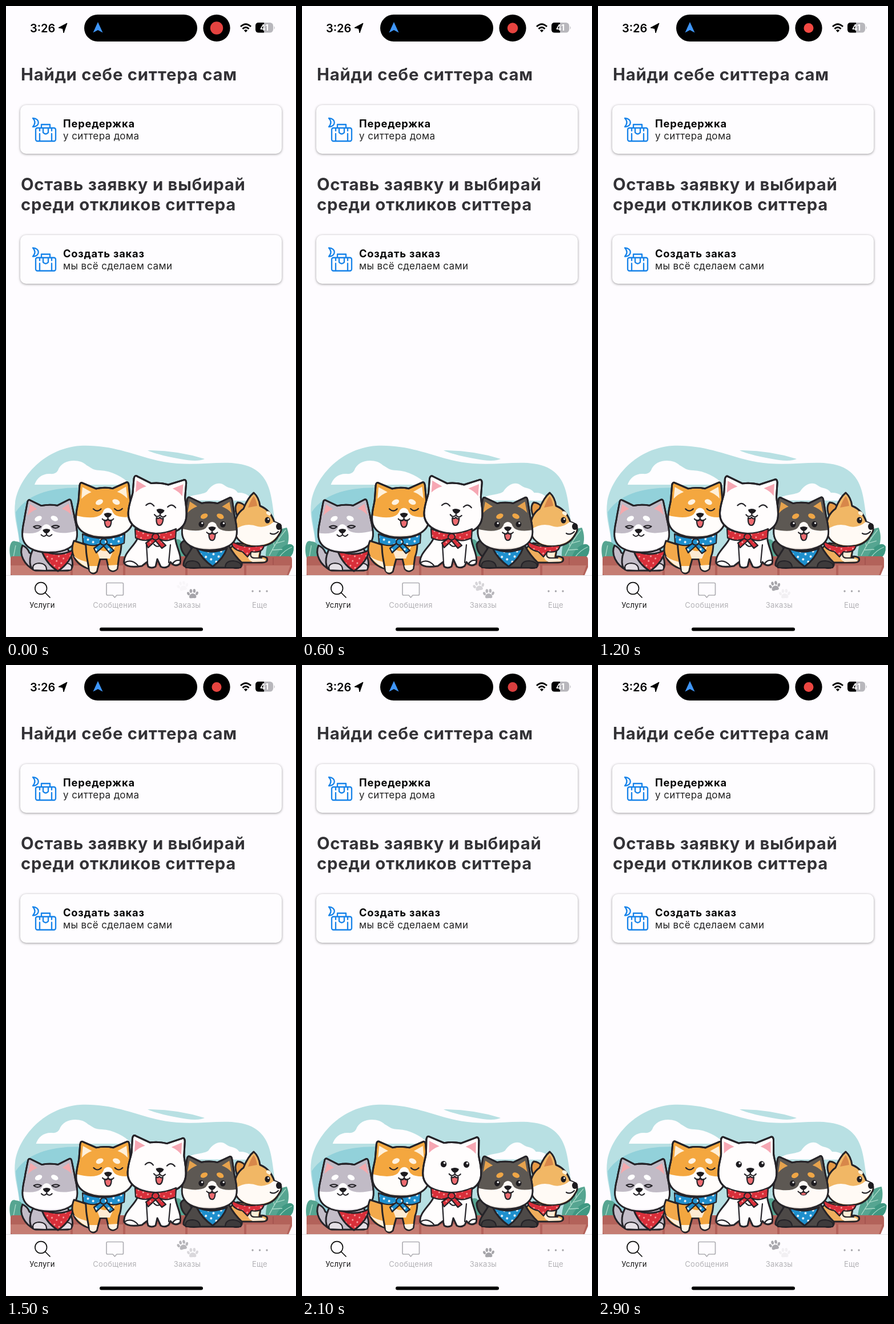
Write an HTML page that moves like this. It is 508x1102 px and loops after 3000 ms.

```html
<!DOCTYPE html>
<html lang="ru">
<head>
<meta charset="utf-8">
<style>
html, body { margin: 0; width: 100%; height: 100%; overflow: hidden; background: #fefcff; }
svg { display: block; font-family: Inter, Roboto, sans-serif; }
.h { font-size: 29.3px; font-weight: 700; letter-spacing: .75px; fill: #333236; }
.b { font-size: 18.3px; font-weight: 700; letter-spacing: .8px; fill: #050505; }
.s { font-size: 17px; letter-spacing: .4px; fill: #222; }
.tab { font-size: 13px; letter-spacing: .3px; fill: #b3b2b6; text-anchor: middle; }
.card { fill: #fefdff; filter: drop-shadow(0 1px 2px #0006); }
.ink { stroke: #252328; stroke-width: 3; stroke-linejoin: round; stroke-linecap: round; }
.thin { stroke: #252328; stroke-width: 2.2; stroke-linecap: round; stroke-linejoin: round; }
.line { fill: none; }
</style>
</head>
<body>
<svg id="stage" width="508" height="1102" viewBox="0 0 508 1102">
<defs>
  <pattern id="red" width="9" height="9" patternUnits="userSpaceOnUse" patternTransform="rotate(25)">
    <rect width="9" height="9" fill="#d92f3a"/><circle cx="4" cy="4" r="1.4" fill="#ffb3ae"/>
  </pattern>
  <pattern id="blue" width="10" height="10" patternUnits="userSpaceOnUse" patternTransform="rotate(25)">
    <rect width="10" height="10" fill="#1e8fcd"/><circle cx="4" cy="4" r="1.9" fill="#fff"/>
  </pattern>
  <g id="bag" fill="none" stroke="#1683e9" stroke-width="2.3" stroke-linejoin="round" stroke-linecap="round">
    <path d="M47 196Q54 203 47 211C60 211 60 196 47 196Z"/>
    <rect x="52" y="213" width="35" height="23" rx="3"/>
    <path d="M62 212V207H77V212M59 218V214M59 223V235M80 218V214M80 223V235M65 214V221Q69.500 226 74 221V214"/>
  </g>
  <g id="paw">
    <path d="M0 0C4 0 7 4 6 7C5 9 2 8 0 8C-2 8-5 9-6 7C-7 4-4 0 0 0Z"/>
    <ellipse cx="-7.500" cy="0" rx="2.200" ry="3.200" transform="rotate(-25 -7.500 0)"/>
    <ellipse cx="-3" cy="-4.500" rx="2.300" ry="3.400"/>
    <ellipse cx="3" cy="-4.500" rx="2.300" ry="3.400"/>
    <ellipse cx="7.500" cy="0" rx="2.200" ry="3.200" transform="rotate(25 7.500 0)"/>
  </g>
</defs>

<!-- status bar -->
<text x="42" y="45.500" font-size="20" font-weight="600">3:26</text>
<path d="M107 30L92 38L99.500 39.500L101 47Z" stroke="#000" stroke-linejoin="round"/>
<rect x="137" y="15" width="198" height="47" rx="23.500"/>
<path d="M161 28L169.500 46.500L161 42L152.500 46.500Z" fill="#3f96f8"/>
<circle cx="369" cy="38.500" r="23.600"/>
<circle id="rec" cx="369" cy="38.500"/>
<g fill="none" stroke="#000" stroke-width="2.900">
  <path d="M411 36Q420 27.500 429 36M414.500 40Q420 34.500 425.500 40"/>
</g>
<path d="M416.800 42.600Q420 39.800 423.200 42.600L420 46Z"/>
<rect x="437" y="29" width="31" height="17.500" rx="5.500" fill="#b8b7bc"/>
<path d="M452 29H442.500Q437 29 437 34.500V41Q437 46.500 442.500 46.500H452Z"/>
<path d="M469.500 35Q472 38 469.500 41Z" fill="#b8b7bc"/>
<text x="452.500" y="43" font-size="14" font-weight="700" fill="#fff" text-anchor="middle">41</text>

<!-- services -->
<text class="h" x="26" y="130">Найди себе ситтера сам</text>
<rect class="card" x="25" y="173" width="458" height="85" rx="10"/>
<use href="#bag"/>
<text class="b" x="100" y="212">Передержка</text>
<text class="s" x="100" y="233">у ситтера дома</text>
<text class="h" x="26" y="322">Оставь заявку и выбирай</text>
<text class="h" x="26" y="357">среди откликов ситтера</text>
<rect class="card" x="25" y="400" width="458" height="85" rx="10"/>
<use href="#bag" y="226.500"/>
<text class="b" x="100" y="438.500">Создать заказ</text>
<text class="s" x="100" y="459.500">мы всё сделаем сами</text>

<!-- landscape -->
<path fill="#b8e0e3" d="M24 962C26 920 12 900 16 868C20 830 62 773 130 768C200 765 240 795 300 799C350 803 395 790 430 806C470 826 464 870 474 915L480 962Z"/>
<path fill="#b8e0e3" d="M248 776Q300 776 348 791Q335 797 305 791Q265 784 248 776Z"/>
<path fill="#92d1da" d="M17 884C40 850 84 838 150 842V962H24C26 930 18 905 17 884Z"/>
<g id="clouds" fill="#fefdff">
  <path d="M50 836C54 824 64 816 78 817Q87 818 91 811C98 790 130 790 141 802C150 807 153 811 165 811C185 812 205 822 218 836Z"/>
  <path d="M312 863C325 851 343 855 352 848C360 835 374 829 384 838C392 844 399 840 406 850C420 849 428 856 430 864Z"/>
</g>
<g id="bush" fill="#56a591">
  <path d="M8 964C4 945 8 931 17 935C27 935 34 945 40 964Z"/>
  <path d="M288 964C286 940 294 928 304 932C312 938 314 952 313 964Z"/>
  <path d="M455 964C454 932 472 914 492 911C499 930 494 948 480 964Z"/>
  <path fill="#3f9882" d="M472 964C480 942 499 934 504 944Q505 957 496 964Z"/>
  <path fill="none" stroke="#a9d9c8" stroke-width="1.300" d="M461 960Q474 934 490 915M470 943L468 932M478 932V921M474 938L488 934M467 950L484 949M479 962Q488 950 501 945M13 962L17 942"/>
</g>
<path fill="#b3625a" d="M8 994V965Q8 961 12 961H496Q501 961 501 967V980L495 994Z"/>
<path fill="#c57d73" d="M8 977H113V994H12Q8 994 8 988ZM117 977H205V994H117ZM209 977H314V994H209ZM318 977H417V994H318ZM421 977H498L492 994H421Z"/>
<path stroke="#a3534d" stroke-width="1.500" d="M62 963V976M205 963V976M310 963V976M468 963V976"/>

<g id="dogs"></g>

<!-- tabs -->
<path fill="#fefcff" d="M0 994.500H508V1102H0Z"/>
<path stroke="#e2e1e5" d="M0 994.500H508"/>
<g fill="none" stroke-width="1.700">
  <path stroke="#111" stroke-linecap="round" d="M68.500 1024.500L77 1033M71.500 1017A10.300 10.300 0 1 0 50.900 1017A10.300 10.300 0 1 0 71.500 1017"/>
  <path stroke="#b0afb4" stroke-linejoin="round" d="M178 1007.500H203.500Q205.500 1007.500 205.500 1009.500V1027Q205.500 1029 203.500 1029H194L190.500 1033L187 1029H178Q176 1029 176 1027V1009.500Q176 1007.500 178 1007.500Z"/>
</g>
<g fill="#a6a5aa">
  <use id="pawA" href="#paw" transform="translate(309.500 1012.500) rotate(-12)"/>
  <use id="pawB" href="#paw" transform="translate(327 1026) rotate(-2)"/>
  <circle cx="432" cy="1022" r="1.700"/><circle cx="444.500" cy="1022" r="1.700"/><circle cx="457" cy="1022" r="1.700"/>
</g>
<text class="tab" x="63.500" y="1050.500" style="fill:#111">Услуги</text>
<text class="tab" x="190.500" y="1050.500">Сообщения</text>
<text class="tab" x="317.500" y="1050.500">Заказы</text>
<text class="tab" x="444.500" y="1050.500">Еще</text>
<rect x="164" y="1085.500" width="181" height="6" rx="3"/>
</svg>
<script>
const $ = id => document.getElementById(id);
const path = (d, fill, cls = 'ink') => `<path class="${cls}" fill="${fill}" d="${d}"/>`;
const oval = (x, y, rx, ry, fill, more = '') =>
  `<ellipse cx="${x}" cy="${y}" rx="${rx}" ry="${ry}" fill="${fill}" ${more}/>`;
const pair = draw => draw(-1) + draw(1);

const eyes = {
  sleepy: s => `<path class="thin line" d="M${s * 19 - 7} -5q7 7 14 0"/>`,
  calm: s => `<path class="thin line" d="M${s * 17 - 7} -2q7 6 14 0q-7 -4 -14 0"/>`,
  happy: s => `<path class="thin line" d="M${s * 19 - 7} -2q7 -8 14 0"/>`,
  open: s => oval(s * 20, -4, 5.2, 5.6, '#1d1b1f') + oval(s * 20 + 1.5, -6, 1.8, 1.8, '#fff')
};

// Front view of a head around 0,0; "ear" is half the distance between the ear tips
function head(o) {
  const { ear, coat } = o, r = ear + 4;
  const outline = `M-51 12C-51-4-47-12-46-22L${-r}-47Q${-r + 1}-54 ${-ear + 2}-51L-15-41Q0-44 15-41` +
    `L${ear - 2}-51Q${r - 1}-54 ${r}-47L46-22C47-12 51-4 51 12C51 36 28 46 0 46C-28 46-51 36-51 12Z`;
  const innerEar = s => path(`M${s * (ear - 1)}-44L${s * 41}-23Q${s * 34}-31 ${s * 23}-35Z`, o.inner, '');
  const mask = 'M-66 4Q-36 13-20 9Q-10 7-7-3Q0-10 7-3Q10 7 20 9Q36 13 66 4V60H-66Z';
  return `<g id="${o.id}"><g transform="translate(${o.x} ${o.y}) scale(${o.size})">
    <clipPath id="${o.id}Clip"><path d="${outline}"/></clipPath>
    ${path(outline, coat)}
    <g clip-path="url(#${o.id}Clip)">
      ${pair(innerEar)}
      <g transform="translate(${o.look} 0)">${o.mask ? path(mask, o.mask, '') : ''}</g>
      ${path('M-60 20Q-36 43 0 42Q36 43 60 20V60H-60Z', o.shade, '')}
    </g>
    ${path(outline, 'none')}
    <g transform="translate(${o.look} 0)">
      ${o.brow ? pair(s => oval(s * 15, -17, 7, 4.5, o.brow, `transform="rotate(${s * 25} ${s * 15} -17)"`)) : ''}
      ${o.face}
      ${path('M-7 4Q0 0 7 4Q6 9 0 11Q-6 9-7 4Z', '#1d1b1f', '')}
      ${path('M-10 13Q-5 19 0 13Q5 19 10 13M0 10V13', 'none', 'thin line')}
    </g></g></g>`;
}

const tongue = (id = 'tongue') => `<g id="${id}">` +
  path('M-6 15Q-6 28 0 28Q6 28 6 15Q3 18 0 14Q-3 18-6 15Z', '#ee6b70', 'thin') + '</g>';

// Neckerchief with a knot and two loose ends
const scarf = (x, y, half, pattern) => path(
  `M${x - half} ${y - 8}Q${x} ${y + 8} ${x + half} ${y - 8}L${x + half - 1} ${y + 8}` +
  `Q${x + 18} ${y + 16} ${x + 7} ${y + 10}L${x + 18} ${y + 21}L${x + 11} ${y + 26}L${x} ${y + 13}` +
  `L${x - 13} ${y + 25}L${x - 17} ${y + 17}L${x - 6} ${y + 9}Q${x - 18} ${y + 16} ${x - half + 1} ${y + 8}Z`,
  `url(#${pattern})`, 'thin') + oval(x, y + 6, 6, 5.5, `url(#${pattern})`, 'class="thin"');

const profile =
  path('M405 938C382 950 380 972 394 972H448Q460 972 457 964Q451 960 444 962L447 944Z', '#efae5d') +
  path('M424 950Q420 966 432 971L454 970Q456 965 441 964L444 950Z', '#fdeed8', '') +
  path('M430 951Q425 964 436 964H448', 'none', 'thin line') +
  path('M406 894Q398 874 406 867Q415 867 423 878Z', '#e69a45') +
  path('M400 912C400 896 406 885 416 878Q424 858 434 850Q443 858 445 873C458 878 466 889 470 901Q477 903 481 907Q484 916 479 922C472 936 458 944 438 944C414 944 400 930 400 912Z', '#f1b765') +
  path('M402 914Q420 901 441 909Q456 912 469 901Q477 903 480 907Q482 917 477 922C470 935 456 942 438 942C416 942 402 930 402 914Z', '#fffaf5', '') +
  path('M424 876Q429 862 434 856Q439 864 440 873Z', '#d8874a', '') +
  oval(458, 898, 4.6, 5.6, '#1d1b1f') + oval(459.5, 896, 1.5, 1.5, '#fff') +
  oval(460, 886, 4.5, 3, '#fff3df', 'transform="rotate(35 460 886)"') +
  oval(478, 909, 5, 6, '#1d1b1f') +
  path('M477 918Q470 925 463 921', 'none', 'thin line') +
  path('M395 934Q412 948 452 942Q450 956 430 953L423 962L414 953Q394 949 395 934Z', 'url(#red)', 'thin');

const grey =
  path('M50 985C32 977 22 957 29 942Q38 946 41 955L56 962Z', '#c3bdc8') +
  path('M50 944C38 964 40 984 52 986H108C120 985 119 968 108 948Z', '#c3bdc8') +
  path('M48 985Q44 974 58 973Q72 974 71 986ZM93 986Q91 974 104 973Q119 974 114 985Z', '#e5e0e6', 'thin') +
  path('M62 950Q90 964 118 950Q113 972 91 987Q70 974 62 950Z', 'url(#red)') +
  head({ id: 'grey', x: 77, y: 911, size: .94, ear: 37, coat: '#c1bbc6', inner: '#f4a9ad', mask: '#fffdff',
    shade: '#eeeaf0', brow: '#fff', look: -6, face: pair(eyes.calm) });

const orange =
  path('M150 984C122 978 110 956 119 934L150 944Z', '#f3a94b') +
  path('M118 960Q132 978 150 984V972Q130 970 118 960Z', '#fff0dc', '') +
  path('M140 922C138 950 143 970 146 986Q152 995 159 988L165 966H176L180 983Q187 991 195 983L198 962Q204 948 201 922Z', '#f3a63f') +
  path('M156 942Q173 962 192 942L182 965H164Z', '#fdebd3', '') +
  path('M146 978L147 987Q152 992 158 987L160 978ZM179 977L181 983Q187 989 194 983L195 976Z', '#fff4e4', '') +
  head({ id: 'orange', x: 173, y: 883, size: .98, ear: 40, coat: '#f4a73f', inner: '#fff0d9', mask: '#fffdfb',
    shade: '#f6ebe2', brow: '#fff3e2', look: 6, face: tongue() + pair(eyes.sleepy) }) +
  scarf(171, 930, 37, 'blue');

const white =
  path('M233 920C232 940 204 954 207 973Q212 982 238 978L247 971L249 979Q255 983 262 979L265 966L271 979Q278 983 285 978L288 971Q296 981 305 974C309 955 293 940 297 918Z', '#fffdfd') +
  path('M246 941L248 972M288 941L285 972M259 940Q266 948 273 939', 'none', 'thin line') +
  path('M208 972Q220 965 231 977M292 974Q296 967 304 968', 'none', 'thin line') +
  head({ id: 'white', x: 262, y: 876, size: 1, ear: 42, coat: '#fffdfd', inner: '#f6a7b3', shade: '#f3eff2', look: 5,
    face: `<g transform="translate(0 3)">${tongue()}</g><g id="shut">${pair(eyes.happy)}</g><g id="open">${pair(eyes.open)}</g>` }) +
  scarf(262, 921, 36, 'red');

const dark =
  path('M322 966Q306 956 306 940Q312 929 319 938L330 955Z', '#4a4645') +
  path('M330 940C320 956 310 968 311 977Q316 983 340 981H398Q415 984 413 972Q400 960 390 942Z', '#4d4947') +
  path('M315 981Q312 969 327 969Q340 970 340 981ZM384 981Q384 969 398 969Q415 971 411 981Z', '#3d3a3b', 'thin') +
  path('M334 947Q360 959 387 947Q381 965 362 979Q343 966 334 947Z', 'url(#blue)') +
  head({ id: 'dark', x: 356, y: 907, size: .94, ear: 38, coat: '#5d5853', inner: '#e6a24d', mask: '#fffaf6',
    shade: '#f1e8e2', brow: '#efa646', look: 5, face: tongue('darkTongue') + pair(s => `<g transform="translate(0 2)">${eyes.open(s)}</g>`) });

$('dogs').innerHTML = profile + grey + orange + dark + white;

// Value at t from a list of time, value pairs
function at(t, ...keys) {
  let i = 0;
  while (i < keys.length - 4 && t > keys[i + 2]) i += 2;
  const [t0, v0, t1, v1] = keys.slice(i, i + 4);
  const p = Math.min(1, Math.max(0, (t - t0) / (t1 - t0)));
  return v0 + (v1 - v0) * p * p * (3 - 2 * p);
}
const set = (id, name, value) => $(id).setAttribute(name, value);
const turn = (id, angle, x, y) => set(id, 'transform', `rotate(${angle} ${x} ${y})`);

function draw(now) {
  const t = Math.floor(now % 3000 / 100) * 100;

  const glow = at(t, 0, .35, 400, .1, 900, 1, 1500, .4, 2050, .05, 2500, 1, 2900, .5);
  set('rec', 'fill', `rgb(${214 + 41 * glow},${60 + 19 * glow},${61 + 8 * glow})`);
  set('rec', 'r', at(t, 0, 11.2, 400, 9.6, 900, 8.5));

  const beat = t % 2000;
  set('pawA', 'opacity', at(beat, 0, .06, 100, 0, 400, .16, 900, .95, 1300, 1, 1500, .8, 2000, .06));
  set('pawB', 'opacity', at(beat, 0, 1, 500, .92, 900, .13, 1200, .13, 1500, .4, 2000, 1));

  turn('white', at(t, 0, 4.7, 900, 4.3, 1500, 3.2, 2500, 0, 2900, -.3), 268, 925);
  turn('grey', at(t, 0, -.7, 400, -1, 2900, 1), 80, 955);
  turn('orange', at(t, 0, -.6, 2900, .5), 172, 930);
  turn('dark', at(t, 0, .5, 400, .3, 900, -1.1, 1500, .3, 2100, 0, 2900, -1.3), 360, 955);

  const awake = t >= 1800;
  set('shut', 'opacity', awake ? 0 : 1);
  set('open', 'opacity', awake ? 1 : 0);
  const mouth = at(t, 0, 1, 2500, 1, 2900, .4);
  set('darkTongue', 'transform', `translate(0 ${15 * (1 - mouth)}) scale(1 ${mouth})`);

  set('clouds', 'transform', `translate(${at(t, 0, 0, 2500, 4)} 0)`);
  set('bush', 'transform', `translate(0 964) skewX(${at(t, 0, 0, 400, 2, 1500, 0, 2500, -5)}) translate(0 -964)`);
  requestAnimationFrame(() => draw(performance.now() - start));
}
const start = performance.now();
draw(0);
</script>
</body>
</html>
```
